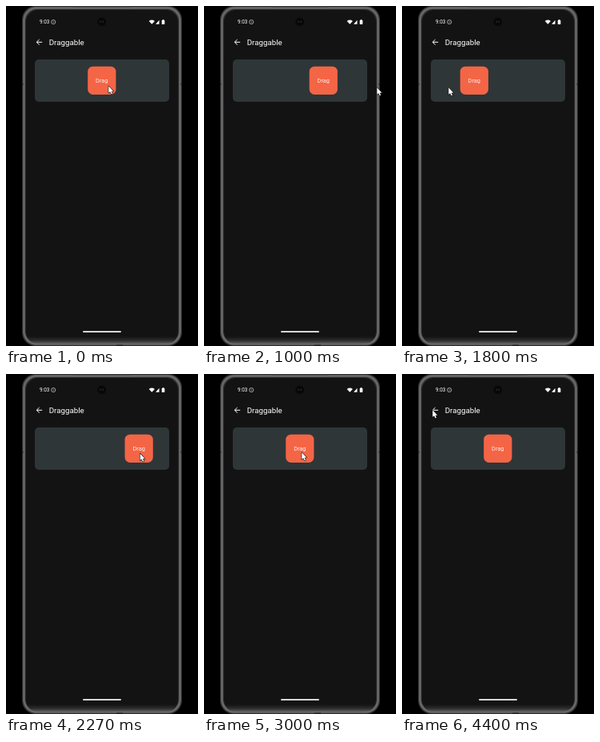
An HTML page with a canvas that plays this animation: 240x426 px, repeating every 4470 ms.

```html
<!DOCTYPE html>
<html lang="en">
<head>
<meta charset="utf-8">
<title>Draggable</title>
<style>
  html, body { margin: 0; width: 100%; height: 100%; overflow: hidden; background: #000; }
  canvas { display: block; width: 240px; height: 426px; }
</style>
</head>
<body>
<canvas id="stage" width="240" height="426"></canvas>
<script>
const ctx = document.getElementById('stage').getContext('2d');
const LOOP = 4470, STEP = 200 / 3, LAST_STEP = 66;
const CENTER = 119.8, SIZE = 35.2, MAX_PULL = 66;
const PULL_SPEED = 0.5;   // px per ms
const STIFFNESS = 18;     // critically damped spring, 1/s
const RETURN_TIME = 500;

const point = (x, y) => ({ x, y });
const gesture = (start, release, leave, grab, far) => ({ start, release, leave, grab, far });

const gestures = [
  gesture(40, 240, 290, point(128, 100), point(22, 100)),
  gesture(620, 897, 1130, point(119, 99), point(216, 102)),
  gesture(1625, 1730, 1870, point(104, 99), point(58, 102)),
  gesture(2174, 2440, 2440, point(121, 95), point(216, 104)),
  gesture(3164, 3590, 3800, point(122, 98), point(32, 96))
];
const backArrow = point(38, 45);

const clamp = (v, low, high) => Math.min(high, Math.max(low, v));
const smooth = p => p * p * (3 - 2 * p);
const mix = (a, b, p) => point(a.x + (b.x - a.x) * p, a.y + (b.y - a.y) * p);
const currentIndex = t => gestures.filter(g => g.start <= t).length - 1;

function pointerAt(t) {
  const index = currentIndex(t);
  if (index < 0) return gestures[0].grab;
  const { start, leave, grab, far } = gestures[index];
  if (t < leave) {
    const pulled = PULL_SPEED * (t - start) / Math.abs(far.x - grab.x);
    return mix(grab, far, Math.min(1, pulled));
  }
  const next = gestures[index + 1];
  const time = next ? Math.min(RETURN_TIME, next.start - leave) : RETURN_TIME;
  return mix(far, next ? next.grab : backArrow, smooth(Math.min(1, (t - leave) / time)));
}

// The square follows the pointer up to the edge and springs back on release.
function squareOffset(t) {
  const index = currentIndex(t);
  if (index < 0) return 0;
  const { grab, release } = gestures[index];
  const pull = pointerAt(Math.min(t, release - 1)).x - grab.x;
  const w = Math.max(0, t - release) / 1000 * STIFFNESS;
  return clamp(pull, -MAX_PULL, MAX_PULL) * (1 + w) * Math.exp(-w);
}

function box(x, y, w, h, r, fill) {
  ctx.beginPath();
  ctx.roundRect(x, y, w, h, r);
  ctx.fillStyle = fill;
  ctx.fill();
}

function disc(x, y, r, fill) {
  ctx.beginPath();
  ctx.arc(x, y, r, 0, Math.PI * 2);
  ctx.fillStyle = fill;
  ctx.fill();
}

function fillPath(path, color) {
  ctx.fillStyle = color;
  ctx.fill(new Path2D(path));
}

function strokePath(path, color, width) {
  ctx.strokeStyle = color;
  ctx.lineWidth = width;
  ctx.stroke(new Path2D(path));
}

function label(text, x, y, size, align = 'left', color = '#fff') {
  ctx.font = `${size}px Roboto, sans-serif`;
  ctx.textAlign = align;
  ctx.fillStyle = color;
  ctx.fillText(text, x, y);
}

function drawPhone() {
  box(0, 0, 240, 426, 0, '#000');
  const rim = ['#303030', '#565656', '#747474', '#565656', '#2c2c2c'];
  rim.forEach((color, i) => box(20 + i, i, 200 - 2 * i, 426 - 2 * i, 17 - i / 2, color));

  const glow = ctx.createLinearGradient(0, 414, 0, 424);
  glow.addColorStop(0, '#131313');
  glow.addColorStop(0.5, '#2c2c2c');
  glow.addColorStop(1, '#686868');
  box(25, 5, 190, 418.5, 15, glow);

  box(84, 0, 72, 1.6, 0, '#3a3a3a');
  box(138, 424.5, 8, 1.5, 0, '#202020');
  for (const x of [20, 218]) box(x, 97.5, 2, 1.2, 0, '#222');
}

function drawStatusBar() {
  label('9:03', 42, 22.3, 6.4);
  ctx.beginPath();
  ctx.arc(59.2, 20, 2.6, 0, Math.PI * 2);
  ctx.strokeStyle = '#ddd';
  ctx.lineWidth = 0.7;
  ctx.stroke();
  strokePath('M59.2 18.8V21.2', '#ccc', 0.6);

  disc(119.7, 19.7, 5.4, '#080808');
  for (const side of [-1, 1]) disc(119.7 + side * 1.5, 19.7, 0.9, '#303030');

  fillPath('M182.3 22.8L178.7 19A5.2 5.2 0 0 1 185.9 19Z', '#fff');
  fillPath('M187 22.7H191.5V17.7Z', '#fff');
  box(194.7, 17.8, 3.6, 5.1, 0.6, '#fff');
  box(195.7, 17, 1.6, 1, 0, '#fff');
}

function drawScreen() {
  drawPhone();
  drawStatusBar();
  strokePath('M45.2 45.3H38.3M41.6 42L38.2 45.3L41.6 48.6', '#fff', 1);
  label('Draggable', 53.7, 48.9, 9.75);
  box(36, 67, 168, 53, 5, '#2f3638');
  box(96, 407.2, 48, 1.7, 0.8, '#f2f2f2');
}

function drawSquare(x) {
  box(x - SIZE / 2, 75.7, SIZE, SIZE, 6.5, '#f46546');
  label('Drag', x, 95.8, 7.4, 'center', '#ffece7');
}

function drawPointer({ x, y }) {
  const arrow = 'M.3 .3V8.8L2.2 7.2L3.6 10.3L5 9.7L3.7 6.7H6.3Z';
  ctx.save();
  ctx.translate(x, y);
  ctx.lineJoin = 'round';
  strokePath(arrow, '#111', 1.2);
  fillPath(arrow, '#fff');
  ctx.restore();
}

function draw(now) {
  const step = Math.min(LAST_STEP, Math.floor((now % LOOP + 3.5) / STEP));
  const t = step * STEP;
  drawScreen();
  drawSquare(CENTER + squareOffset(t));
  drawPointer(pointerAt(t));
}

const start = performance.now();
function tick() {
  draw(performance.now() - start);
  requestAnimationFrame(tick);
}
tick();
</script>
</body>
</html>
```
